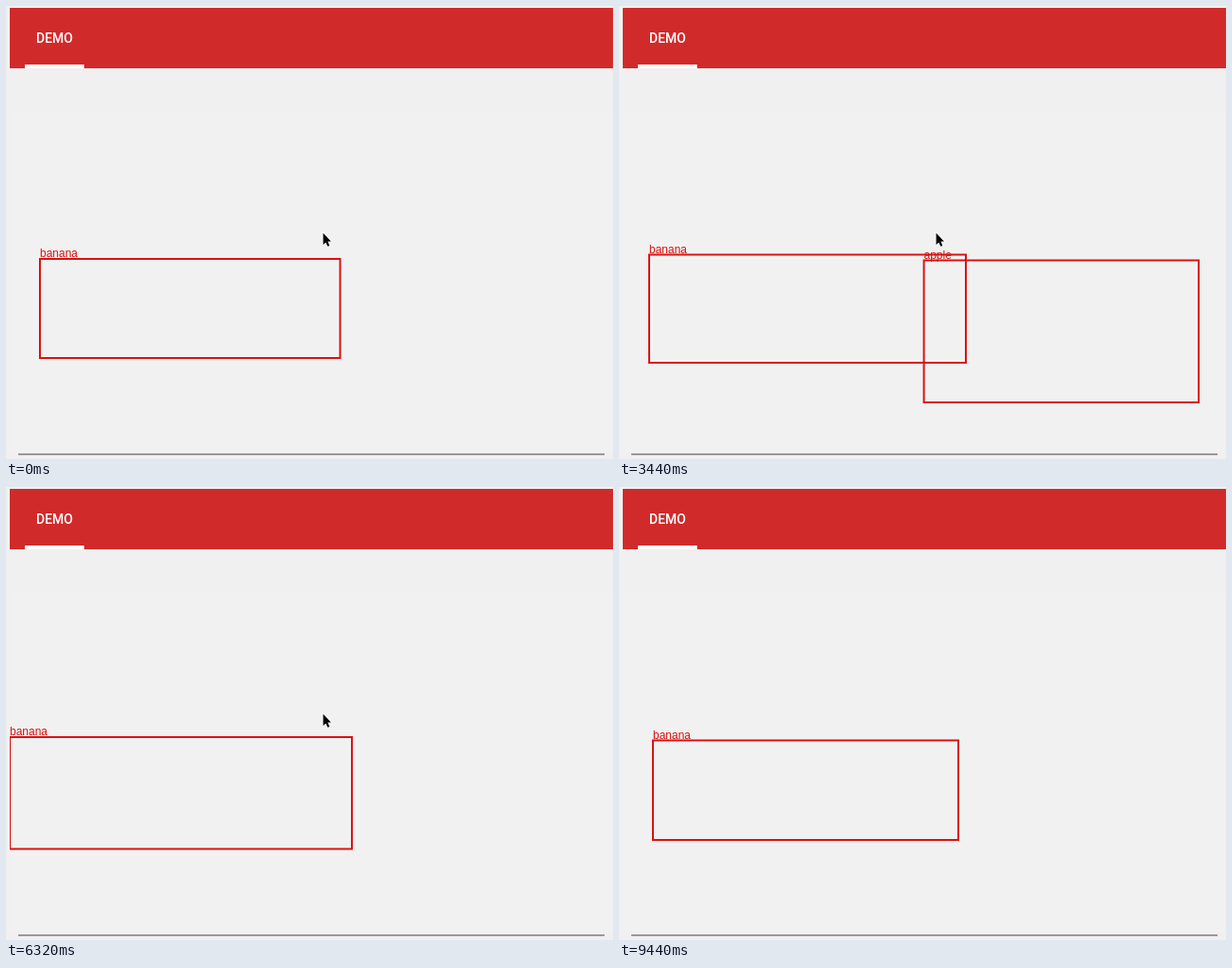
These frames come from a looping animation (644 px wide and 480 px high, 9600 ms). An HTML page with a canvas:

```html
<!DOCTYPE html>
<html lang="en">
<head>
<meta charset="utf-8">
<title>Detection demo</title>
<style>
html, body { margin: 0; width: 100%; height: 100%; overflow: hidden; background: #f0f0f0; }
canvas { display: block; }
</style>
</head>
<body>
<canvas id="stage" width="644" height="480"></canvas>
<script>
const ctx = document.getElementById('stage').getContext('2d');
const LOOP = 9600;
const CURSOR_MOVES = 7760, CURSOR_HIDES = 7920;

// Each detection holds until the next: start time, then left, top, right, bottom
const detections = [
  { at: 0, banana: [36, 268, 354.5, 373] },
  { at: 1040, banana: [17, 265, 363, 376], apple: [321, 268, 638, 424] },
  { at: 1920, banana: [34, 262, 370.5, 376.5], apple: [323.5, 268, 615, 421] },
  { at: 3040, banana: [29, 262, 367, 377], apple: [323, 268, 620, 421] },
  { at: 3440, banana: [32, 263.5, 368, 378], apple: [323.5, 269.5, 615, 420] },
  { at: 3760, banana: [28, 263, 365, 377], apple: [323, 269, 615, 421] },
  { at: 4080, banana: [38, 262, 361, 375], apple: [321, 269, 615, 421] },
  { at: 4800, banana: [38, 261.5, 361.5, 374], apple: [318.5, 268, 631.5, 421.5] },
  { at: 4960, banana: [32, 263, 364, 376], apple: [320, 268, 630, 420] },
  { at: 5920, banana: [4, 265, 367, 383.5] },
  { at: 6480, banana: [26, 267, 364, 379] },
  { at: 6960, banana: [26, 267, 374, 379] },
  { at: 7360, banana: [27, 268, 365, 374] },
  { at: 7760, banana: [12, 267, 358, 373] },
  { at: 8160, banana: [30.5, 267, 354.5, 370] },
  { at: 8800, banana: [30.5, 267, 354, 372] },
  { at: 9120, banana: [34, 266, 366, 376] },
  { at: 9200, banana: [36, 268.5, 360, 374] },
];

function fill(color, x, y, w, h) {
  ctx.fillStyle = color;
  ctx.fillRect(x, y, w, h);
}

function text(label, x, y, font, color) {
  ctx.font = font;
  ctx.fillStyle = color;
  ctx.fillText(label, x, y);
}

function drawPage() {
  fill('#f0f0f0', 0, 0, 644, 480);
  fill('#f1f1f1', 4, 112, 640, 361);
  fill('#d12a2a', 4, 2, 640, 64);
  fill('#fff', 20, 62, 63, 4);
  text('DEMO', 32, 39, '500 14px Roboto, sans-serif', '#fff');
  fill('#999', 13, 474, 622, 2);
}

function drawBox(label, [left, top, right, bottom]) {
  ctx.strokeStyle = '#dc1010';
  ctx.lineWidth = 2;
  ctx.strokeRect(left, top, right - left, bottom - top);
  text(label, left, top - 2, '12px "Liberation Sans", Arial, sans-serif', '#dc1010');
}

function drawCursor(x, y) {
  const arrow = new Path2D('M0 0V12.5L2.8 9.9L4.8 14.3L6.8 13.4L4.9 9.1H8.4Z');
  ctx.save();
  ctx.translate(x, y);
  ctx.strokeStyle = '#fff';
  ctx.lineWidth = 1.5;
  ctx.stroke(arrow);
  ctx.fillStyle = '#000';
  ctx.fill(arrow);
  ctx.restore();
}

function draw(time) {
  drawPage();
  const { banana, apple } = detections.findLast(d => d.at <= time);
  ctx.save();
  ctx.beginPath();
  ctx.rect(4, 112, 640, 361);
  ctx.clip();
  drawBox('banana', banana);
  if (apple) drawBox('apple', apple);
  ctx.restore();
  if (time < CURSOR_MOVES) drawCursor(336.5, 240.5);
  else if (time < CURSOR_HIDES) drawCursor(413, 280);
}

const start = performance.now();
function tick() {
  draw((performance.now() - start) % LOOP);
  requestAnimationFrame(tick);
}
tick();
</script>
</body>
</html>
```
